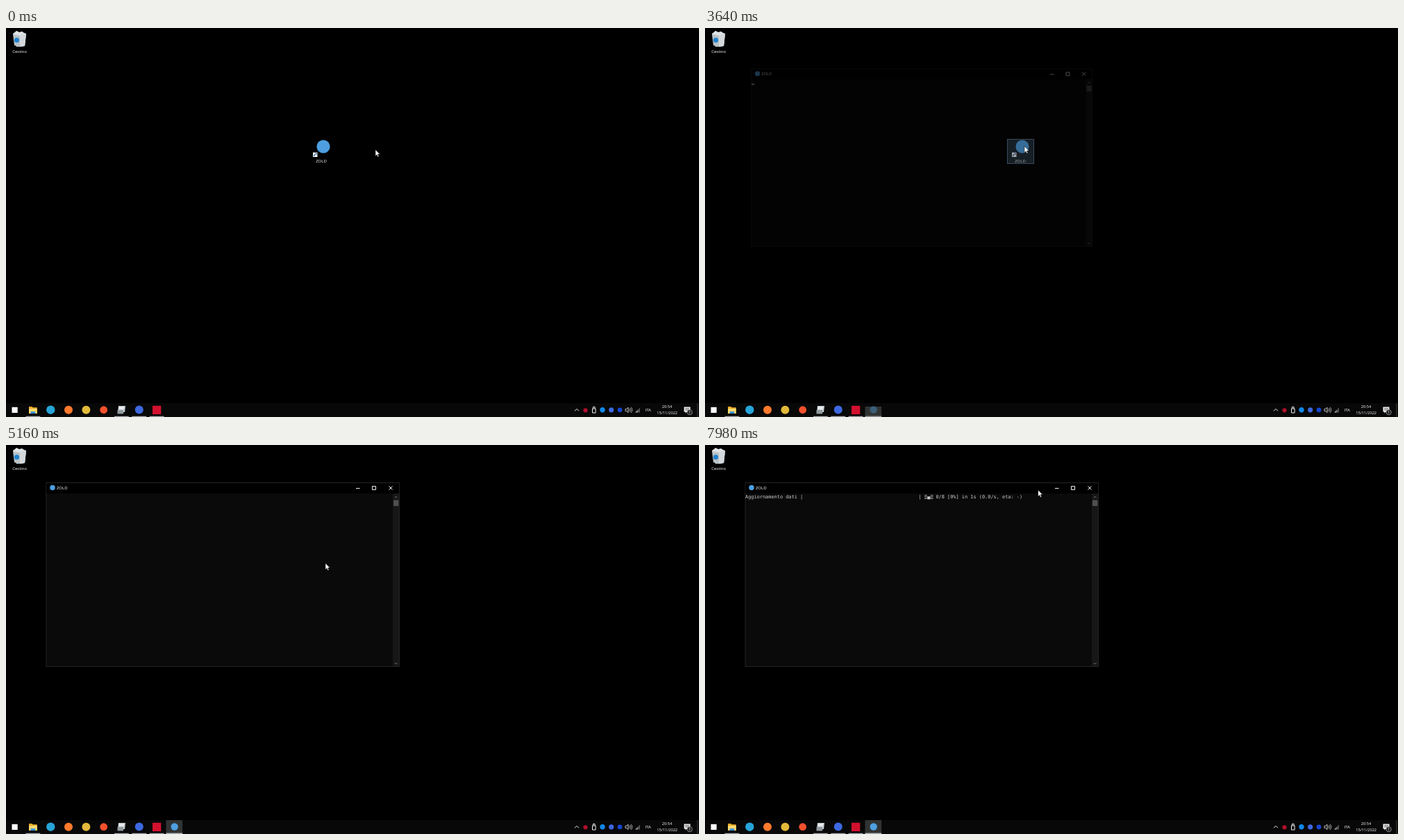
An HTML page that plays this animation: 998 by 561 pixels, repeating every 8 s.

```html
<!DOCTYPE html>
<html lang="it">
<head>
<meta charset="utf-8">
<title>Desktop</title>
<style>
  html, body { margin: 0; width: 100%; height: 100%; overflow: hidden; background: #000; }
  svg { display: block; width: 100%; height: 100%; }
  text { font: 6px "Open Sans", "Noto Sans", sans-serif; fill: #fff; }
  .mid { text-anchor: middle; }
  .mono { font: 6.91px "DejaVu Sans Mono", "Liberation Mono", monospace; fill: #ccc; white-space: pre; }
  .line { fill: none; stroke: #eee; stroke-width: 1; }
</style>
</head>
<body>
<svg viewBox="0 0 998 561">
  <rect width="998" height="561"/>

  <!-- recycle bin -->
  <path d="M10 8l3-2 2-2 4 2 4-1 3 2 3 1-2 18-12 1z" fill="#dfe3e5"/>
  <path d="M10 9l10 2 9-3-2 18-8 1-7-2z" fill="#b9c2c6"/>
  <path d="M20 11l9-3-2 18-7 1z" fill="#d3d9dc"/>
  <circle cx="15.5" cy="17.5" r="3.6" fill="#2182cf"/>
  <text class="mid" x="19.7" y="36.2">Cestino</text>

  <!-- desktop shortcut -->
  <rect id="hover" x="435.5" y="160.5" width="38" height="35"/>
  <circle cx="457" cy="171" r="9.6" fill="#4d9fe0"/>
  <rect x="442" y="179.5" width="6.5" height="6.5" fill="#f2f2f2"/>
  <path d="M443.7 185q-.2-2.6 2.2-2.8" fill="none" stroke="#1d58a8" stroke-width="1.1"/>
  <path d="M445.3 180.5h2.4v2.7z" fill="#1d58a8"/>
  <text class="mid" x="454" y="193.6">ZOLD</text>

  <!-- console window -->
  <g id="win">
    <rect x="58" y="54.5" width="508.5" height="265" fill="#0a0a0a" stroke="#2b2d2d" stroke-width=".8"/>
    <rect x="58.4" y="55" width="507.7" height="15" fill="#000"/>
    <circle cx="67" cy="61.5" r="3.8" fill="#4d9fe0"/>
    <text x="73" y="64.2">ZOLD</text>
    <path class="line" d="M504 62.5h5.5M527.5 59.5h5v5h-5zM551.5 59.5l5 5m0-5l-5 5"/>
    <rect x="557" y="70" width="9" height="249" fill="#171717"/>
    <rect x="558" y="79.5" width="7.3" height="8.5" fill="#4f4f4f"/>
    <path d="M560 76l1.7-1.7 1.7 1.7M560 314.3l1.7 1.7 1.7-1.7" fill="none" stroke="#8a8a8a" stroke-width=".9"/>
    <rect id="caret" x="58.3" y="76.6" width="4.2" height="1.7" fill="#ccc"/>
    <g id="progress">
      <text class="mono" id="label" x="58" y="77" xml:space="preserve"></text>
      <path id="spinner" fill="#ccc"/>
    </g>
  </g>

  <!-- taskbar -->
  <rect y="541" width="998" height="20" fill="#080808"/>
  <g id="tile">
    <rect x="230.5" y="541" width="23.7" height="20" fill="#313333"/>
  </g>
  <circle id="tileIcon" cx="242.7" cy="550.5" r="5.2" fill="#4d9fe0"/>
  <rect id="tileLine" x="230.5" y="559.6" width="23.7" height="1.4" fill="#b4b8ba"/>
  <g id="bar">
    <path d="M33 546h4.5l1.2 1.3h6v8.7h-11.7z" fill="#e9ab28"/>
    <path d="M33 549h11.7v7h-11.7z" fill="#ffdb70"/>
    <path d="M35.5 553h6.8v3h-6.8z" fill="#3e94d6"/>
    <path d="M162 545h10l-1 9h-10z" fill="#c9d0d3"/>
    <path d="M160.5 551h8.5v5.5h-8.5z" fill="#8f999e"/>
    <path d="M163 546.5h7l-.5 3h-7z" fill="#eef2f4"/>
  </g>

  <!-- tray -->
  <path class="line" d="M819 552.3l3-3 3 3"/>
  <path d="M844.5 549h4.6v6h-4.6zM845.5 549v-2.5h2.6v2.5" class="line" stroke-width=".9"/>
  <path d="M892 549.4h1.7l2.3-2.2v7.4l-2.3-2.2h-1.7z" fill="none" stroke="#eee" stroke-width=".8"/>
  <path d="M897.5 549.3q1.4 1.6 0 3.2M898.8 548q2.6 2.9 0 5.8M900.1 546.8q3.6 4.1 0 8.2" fill="none" stroke="#ddd" stroke-width=".7"/>
  <path d="M906 554.5l7-7v7z" fill="#505050"/>
  <path d="M906 554.5l3.5-3.5v3.5z" fill="#999"/>
  <text class="mid" x="924.7" y="552.8">ITA</text>
  <text class="mid" x="952" y="548.2" style="font-size:5.6px">20:54</text>
  <text class="mid" x="952.2" y="557.3" style="font-size:5.6px">15/11/2022</text>
  <path d="M976.5 546.5h9v7h-5l-2 2v-2h-2z" fill="#f2f2f2"/>
  <path d="M978 548.7h6M978 550.8h6" stroke="#222" stroke-width=".7"/>
  <circle cx="984.7" cy="554.2" r="3.7" fill="#222" stroke="#aaa" stroke-width=".7"/>
  <text class="mid" x="984.7" y="556.1" style="font-size:5px">1</text>
  <path d="M995.8 541v20" stroke="#4a4a4a" stroke-width=".8"/>

  <path id="mouse" d="M0 0v9.2l2.1-2 1.4 3.2 1.5-.7-1.4-3.1h2.9z" fill="#fff" stroke="#000" stroke-width=".5"/>
</svg>

<script>
const LOOP = 8000;
const $ = id => document.getElementById(id);
const set = (id, attrs) => { for (const k in attrs) $(id).setAttribute(k, attrs[k]); };
const ramp = (t, a, b) => Math.min(1, Math.max(0, (t - a) / (b - a)));

function add(tag, attrs) {
  const el = document.createElementNS('http://www.w3.org/2000/svg', tag);
  for (const k in attrs) el.setAttribute(k, attrs[k]);
  $('bar').append(el);
}
const dot = (cx, cy, r, fill) => add('circle', { cx, cy, r, fill });
const box = (x, y, width, height, fill) => add('rect', { x, y, width, height, fill });

// plain app marks, running-app lines and tray marks
box(8.5, 546.8, 8.2, 8.2, '#fff');
dot(64.3, 550.7, 6.2, '#27a5d8');
dot(90, 550.7, 6, '#ff7a2c');
dot(115.4, 550.7, 6, '#e2b93a');
dot(140.7, 550.7, 5.4, '#f4512c');
dot(191.8, 550.5, 6, '#3d68e0');
box(211, 544.8, 12.3, 12.3, '#d3112f');
for (const x of [28.5, 156, 181.3, 206.7]) box(x, 559.8, 20.8, 1.2, '#a4aaad');
dot(834.5, 551.3, 3.1, '#b0102c');
dot(859, 550.8, 3.7, '#1287e8');
dot(871.7, 550.8, 3.6, '#3d68e0');
dot(884, 550.8, 3.4, '#1546d0');

// pointer way-points: time, x, y
const path = [
  [0, 532, 175.5], [100, 532, 175.5], [840, 490, 178], [940, 490, 178], [960, 488.5, 178],
  [1240, 488.5, 178], [1400, 474, 174], [1800, 474, 174], [2080, 460, 170.5],
  [5300, 460, 170.5], [6020, 468, 102], [6120, 468, 102], [6860, 473, 76.5],
  [6960, 473, 76.5], [7260, 480, 66], [7700, 480, 66], [7840, 479.7, 65], [LOOP, 479.7, 65]
];

function pointer(t) {
  const i = path.findIndex(p => p[0] > t);
  const [a, x, y] = path[i - 1], [b, x2, y2] = path[i];
  const u = ramp(t, a, b), e = u * u * (3 - 2 * u);
  return [x + (x2 - x) * e, y + (y2 - y) * e];
}

// three wave cells; heights without a glyph fall back to three bars
const wave = '???▄???█?▄??';
function cell(x, step) {
  const c = wave[(step + 120) % 12];
  if (c === '█') return `M${x} 70.2h4.3v8h-4.3z`;
  if (c === '▄') return `M${x} 74.2h4.3v4h-4.3z`;
  return [72, 74.3, 76.6].map(y => `M${x + .2} ${y}h3.8v.8h-3.8z`).join('');
}

function draw(t) {
  set('mouse', { transform: `translate(${pointer(t)})` });

  const selected = t >= 2800;
  set('hover', {
    opacity: ramp(t, 1520, 1660),
    fill: selected ? '#1d2935' : '#162125',
    stroke: selected ? '#5a7690' : '#52646a',
    'stroke-width': .9
  });

  const u = ramp(t, 3440, 4200);
  const scale = .95 + .05 * u * (1.2 - .2 * u);
  set('win', {
    opacity: ramp(t, 3440, 4040),
    transform: `translate(312.3 187) scale(${scale}) translate(-312.3 -187)`
  });
  set('caret', { opacity: t < 5160 ? 1 : 0 });

  set('progress', { opacity: t < 5440 ? 0 : 1 });
  $('label').textContent = 'Aggiornamento dati |' + ' '.repeat(40) +
    `|     0/8 [0%] in ${t < 6500 ? 0 : 1}s (0.0/s, eta: -)`;
  const step = Math.floor((t - 5600) / 140) - 2;
  set('spinner', { d: cell(315.8, step - 1) + cell(320.2, step) + cell(324.6, step + 1) });

  const rise = ramp(t, 3460, 3700);
  set('tile', { transform: `translate(0 ${20 * (1 - rise)})` });
  set('tileIcon', { opacity: ramp(t, 3500, 3850) });
  set('tileLine', { opacity: rise });
}

const start = performance.now();
function frame() {
  draw((performance.now() - start) % LOOP);
  requestAnimationFrame(frame);
}
frame();
</script>
</body>
</html>
```
